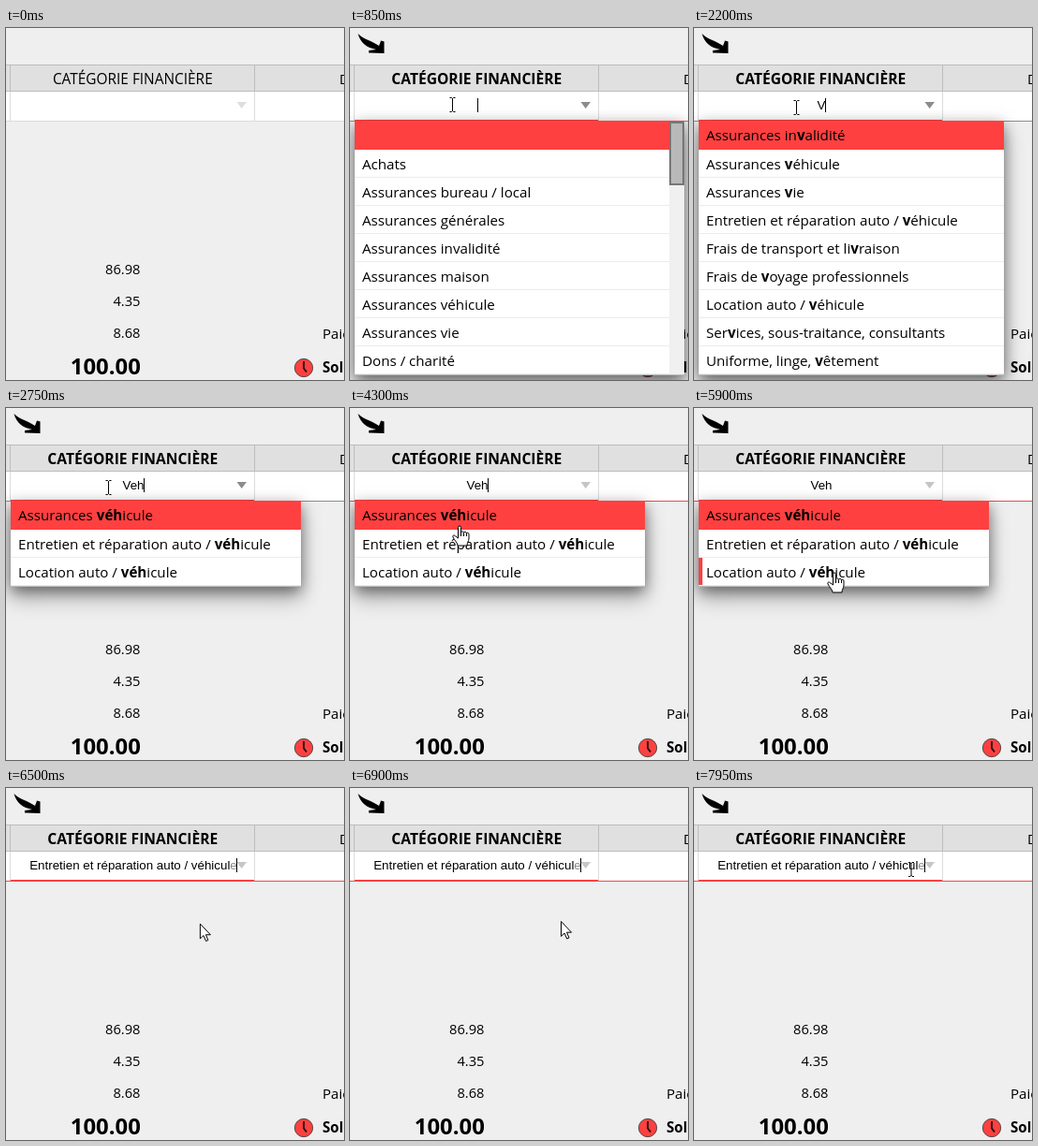
An HTML page that plays this animation: 361 px wide and 376 px high, repeating every 8 s.

```html
<!DOCTYPE html>
<html lang="fr">
<head>
<meta charset="utf-8">
<title>Catégorie financière</title>
<style>
  html, body { margin: 0; width: 100%; height: 100%; overflow: hidden; background: #efefef; }
  svg { position: absolute; left: 0; top: 0; }
  svg, #list { font: 15.15px "Open Sans", "Noto Sans", sans-serif; fill: #000; color: #000; }
  .num { font-size: 14.7px; text-anchor: end; }
  .mid { text-anchor: middle; }
  #list { position: absolute; left: 5px; top: 99px; box-sizing: border-box;
    background: #fff; border-bottom: 1px solid #bbb;
    box-shadow: 0 5px 15px rgba(0,0,0,.5), 0 14px 22px rgba(0,0,0,.2); }
  #list div { height: 30px; line-height: 30px; padding-left: 8px; box-sizing: border-box;
    white-space: pre; border-bottom: 1px solid #ececec; }
  #list div:first-child { height: 31px; background: #ff4040; border-color: #ff4040; }
  #list div.hover:not(:first-child) { box-shadow: inset 4px 0 #ff4040; }
  #bar { position: absolute; right: 0; top: 1px; width: 16px; bottom: 0; background: #f0f0f0; }
  #bar::after { content: ""; position: absolute; left: 0; top: 0; width: 16px; height: 68px;
    box-sizing: border-box; background: #b9b9b9; border: 2px solid #777; }
</style>
</head>
<body>
<svg width="361" height="376">
  <path fill="#e0e0e0" d="M0 39H361V68H0z"/>
  <path fill="#fff" d="M0 68H361V99H0z"/>
  <path fill="none" stroke="#bdbdbd" d="M0 39.5H361M0 67.5H361M4.5 39V68M265.5 39V68"/>
  <path fill="none" stroke="#dcdcdc" d="M4.5 68V99M265.5 68V99"/>
  <path id="line" fill="none" d="M0 99.5H361"/>
  <path id="under" fill="#ff4040" d="M5 98H265V100H5z"/>
  <text id="head" class="mid" x="135.3" y="60">CATÉGORIE FINANCIÈRE</text>
  <text x="356" y="60">DATE</text>
  <text id="field" class="mid" x="136" y="87" font-size="13.333" style="font-family:'Liberation Sans',Arial,sans-serif"></text>
  <path fill="#fff" opacity=".55" d="M239 70H264V97H239z"/>
  <path id="tri" d="M246.500 79H257L251.700 86z"/>
  <path id="caret" d="M0 75h1v15h-1z"/>
  <text class="num" x="143.500" y="263">86.98</text>
  <text class="num" x="143.500" y="297">4.35</text>
  <text class="num" x="143.500" y="331">8.68</text>
  <text class="num" x="143.800" y="370" style="font-size:23.900px;font-weight:700">100.00</text>
  <text x="338" y="332">Paiement</text>
  <text x="338" y="368" font-weight="700">Solde</text>
  <circle cx="318" cy="363" r="9.700" fill="#ff4040" stroke="#333" stroke-width=".8"/>
  <path fill="none" stroke="#111" stroke-width="1.800" d="M318 356V363.500L321 367.500"/>
  <path id="mark" d="M8.500 6C14 12 22 13 31 19L33 13.500L36.500 14.500V27L20 26.500V24L28 23C18 21 11 16 8.500 6z"/>
</svg>
<div id="list"></div>
<svg width="361" height="376">
  <g id="cursor">
    <path id="arrow" fill="#fff" stroke="#000" d="M.5 .5V16.500L4 13L6.700 19L9 18L6.500 12.200H11.500z"/>
    <path id="beam" fill="none" stroke="#000" d="M-3 -7.500H-1L0 -6.500L1 -7.500H3M0 -7V7M-3 7.500H-1L0 6.500L1 7.500H3"/>
    <path id="hand" fill="#fff" stroke="#000" stroke-linejoin="round" d="M-1.500 1.500a1.500 1.500 0 0 1 3 0V7c0-1.500 3-1.500 3 .3c.3-1.300 3-1.200 3 .5c.5-1 2.500-.7 2.500 1V13c0 4-2 4-2 8H-2c0-3-3-5-5-9c-1-2 1.500-2.700 2.500-1.200L-1.500 13zM1.500 7V11M4.500 7.300V11M7.500 7.800V11"/>
  </g>
</svg>
<script>
const $ = id => document.getElementById(id);
const LOOP = 8000, STEP = 50, BLINK = 550;
const FOCUS = 750, LEAVE = 4200, PICK = 6500;
const choice = 'Entretien et réparation auto / véhicule';
const items = ['', 'Achats', 'Assurances bureau / local', 'Assurances générales',
  'Assurances invalidité', 'Assurances maison', 'Assurances véhicule', 'Assurances vie',
  'Dons / charité', choice, 'Frais de transport et livraison',
  'Frais de voyage professionnels', 'Location auto / véhicule',
  'Services, sous-traitance, consultants', 'Uniforme, linge, vêtement'];

// [time, text]: each entry also restarts the caret blink
const typed = [[FOCUS, ''], [2200, 'V'], [2400, 'Ve'], [2750, 'Veh'], [PICK, choice]];

// [time, x, y] of the pointer
const path = [[150, 376, 205], [400, 250, 140], [650, 118, 84], [850, 109.5, 82], [1000, 109.5, 83],
  [1100, 109.5, 85], [3800, 109.5, 85], [3850, 109.5, 86], [4000, 109.5, 86], [4150, 112, 77],
  [4300, 117, 126], [4450, 145, 146], [4800, 264, 159], [4850, 264, 159], [5150, 215, 170],
  [5450, 150, 185], [5650, 149, 185], [5900, 150, 176], [6300, 206, 145], [6750, 208, 144],
  [6900, 225, 142], [7100, 300, 91], [7450, 300, 91], [7700, 262, 77], [7950, 232, 87]];

const clamp = v => Math.max(0, Math.min(1, v));
const fold = s => s.normalize('NFD').replace(/[\u0300-\u036f]/g, '').toLowerCase();
const show = (el, on) => el.style.display = on ? '' : 'none';

function pointer(t) {
  const i = path.findIndex(p => p[0] > t);
  if (i < 0) return path[path.length - 1].slice(1);
  if (i === 0) return path[0].slice(1);
  const a = path[i - 1], b = path[i], k = (t - a[0]) / (b[0] - a[0]);
  return [a[1] + (b[1] - a[1]) * k, a[2] + (b[2] - a[2]) * k];
}

let query = null;
function fill(q) {
  if (q === query) return;
  query = q;
  const found = items.filter(s => fold(s).includes(fold(q))).slice(0, 9);
  $('list').innerHTML = found.map(s => {
    const i = fold(s).indexOf(fold(q)), j = i + q.length;
    return `<div>${s.slice(0, i)}<b>${s.slice(i, j)}</b>${s.slice(j)}</div>`;
  }).join('') + (q ? '' : '<span id="bar"></span>');
  $('list').style.width = (q === '' ? 352 : q === 'V' ? 326 : 310) + 'px';
}

function draw() {
  const t = Math.floor(performance.now() % LOOP / STEP) * STEP;
  const focus = t >= FOCUS, open = focus && t < PICK, over = t < LEAVE;
  const [since, text] = typed.filter(e => e[0] <= t).pop() || [0, ''];
  const [x, y] = pointer(t);

  $('mark').style.opacity = clamp((t - 100) / 500);
  $('head').style.font = (focus ? '700 15.6px' : '15.4px') + ' "Open Sans", sans-serif';
  $('line').setAttribute('stroke', !focus ? '#dcdcdc' : over ? '#8c8c8c' : '#f04848');
  show($('under'), focus);
  $('tri').setAttribute('fill', !focus ? '#dedede' : over ? '#8c8c8c' : '#c6c6c6');

  $('field').textContent = text;
  const end = text ? $('field').getComputedTextLength() / 2 : 0;
  $('caret').setAttribute('transform', `translate(${Math.floor(136 + end)})`);
  show($('caret'), focus && Math.floor((t - since) / BLINK) % 2 === 0);

  show($('list'), open);
  if (open) {
    fill(text);
    $('list').style.opacity = clamp((t - FOCUS + STEP) / 150);
    const row = x > 5 && x < 314 ? Math.floor((y - 100) / 30) : -1;
    $('list').querySelectorAll('div').forEach((d, i) => d.classList.toggle('hover', i === row));
  }

  const kind = open && y > 100 && x < 314 ? 'hand'
    : x > 5 && x < 265 && y > 68 && y < 99 ? 'beam' : 'arrow';
  for (const id of ['arrow', 'beam', 'hand']) show($(id), id === kind);
  $('cursor').setAttribute('transform', `translate(${x} ${y})`);
  requestAnimationFrame(draw);
}
draw();
</script>
</body>
</html>
```
